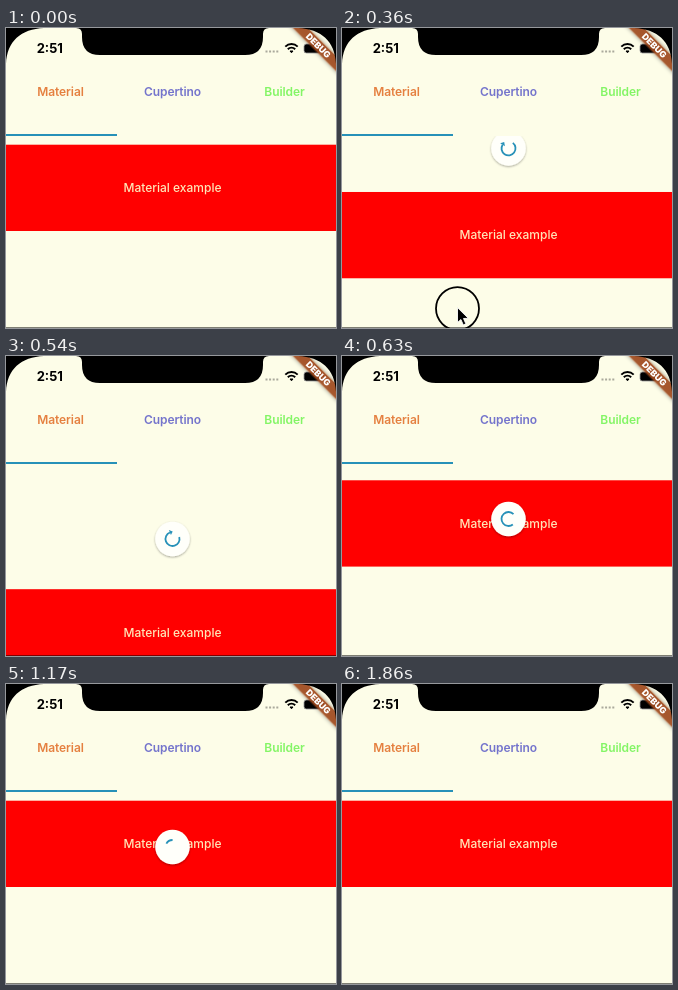
These frames come from a looping animation (330x300 px, 1.98 s). An HTML page:

```html
<!DOCTYPE html>
<html lang="en">
<head>
<meta charset="utf-8">
<title>Pull to refresh</title>
<style>
html, body { margin: 0; height: 100%; overflow: hidden; background: #fdfde8; }
svg { display: block; width: 330px; height: 300px; }
text { font: 12px Inter, "Noto Sans", sans-serif; text-anchor: middle; }
.tab { font-weight: 600; letter-spacing: -.08px; }
</style>
</head>
<body>
<svg viewBox="0 0 330 300">
  <defs>
    <clipPath id="body"><rect y="108" width="330" height="192"/></clipPath>
    <filter id="lift" x="-30%" y="-30%" width="160%" height="160%">
      <feDropShadow dx="0" dy="1" stdDeviation="1.2" flood-opacity=".35"/>
    </filter>
    <filter id="glow" x="-20%" y="-100%" width="140%" height="300%">
      <feDropShadow dx="0" dy="0" stdDeviation="2" flood-opacity=".5"/>
    </filter>
  </defs>
  <rect width="330" height="300" fill="#fdfde8"/>

  <g clip-path="url(#body)">
    <g id="list">
      <rect y="116.7" width="330" height="86.3" fill="#f00"/>
      <text x="166.5" y="164" fill="#ffe6b8" style="font-weight:450">Material example</text>
    </g>
    <g id="spinner">
      <circle r="17.3" fill="#fffffa" filter="url(#lift)"/>
      <path id="arc" fill="none" stroke="#2791b8" stroke-width="1.8"/>
      <path id="head" d="M4.2 0H9.8L7 3Z" fill="#2791b8"/>
    </g>
  </g>
  <rect y="299" width="330" height="1" opacity=".5"/>

  <text class="tab" x="54.5" y="68" fill="#e58040">Material</text>
  <text class="tab" x="166.5" y="68" fill="#7474cc">Cupertino</text>
  <text class="tab" x="278.5" y="68" fill="#84f566">Builder</text>
  <rect y="106" width="111" height="2" fill="#2791b8"/>

  <text x="43.8" y="25.4" style="font-size:13px;font-weight:700">2:51</text>
  <path d="M259.5 23.5h13" stroke="#aaa99c" stroke-width="2" stroke-dasharray="2 1.6"/>
  <g fill="none" stroke="#000" stroke-width="2">
    <path d="M279.3 18.6a9 9 0 0 1 12.4 0M281.8 21.3a5.4 5.4 0 0 1 7.4 0"/>
    <path d="M284 23l1.5 1.8 1.5-1.8z" stroke-width="1" fill="#000"/>
  </g>
  <rect x="298" y="16" width="17.5" height="9" rx="2.6" stroke="#999" stroke-width=".8"/>
  <path d="M317 19v3.2q1.3-.4 1.3-1.6t-1.3-1.6"/>

  <g transform="translate(330) rotate(45)">
    <rect x="-45" y="19.8" width="90" height="10.6" fill="#a34c1c" fill-opacity=".88" filter="url(#glow)"/>
    <text y="28.2" fill="#fff" style="font-size:8.8px;font-weight:900">DEBUG</text>
  </g>
  <path d="M0 0H38C15 1 1 13 0 36ZM330 0H292C315 1 329 13 330 36Z"/>
  <path d="M70 0q6 0 6 6v3q0 18 18 18H239q18 0 18-18V6q0-6 6-6Z"/>

  <g id="cursor">
    <circle id="ring" r="21.5" fill="none" stroke="#000" stroke-width="1.8"/>
    <path d="M0-1V14l3.4-3.1 2.4 5.4 2.6-1.1-2.4-5.3 4.8-.2Z" stroke="#fff" stroke-width=".9"/>
  </g>
</svg>
<script>
const LOOP = 1980, RAD = Math.PI / 180, RELEASE = 560, LOADING = 630;
const el = id => document.getElementById(id);
const list = el('list'), spinner = el('spinner'), arc = el('arc'),
  head = el('head'), cursor = el('cursor'), ring = el('ring');

const part = (t, a, b) => Math.min(1, Math.max(0, (t - a) / (b - a)));
const smooth = p => p * p * (3 - 2 * p);
const mix = (a, b, p) => a + (b - a) * p;
const show = (node, on) => node.style.display = on ? '' : 'none';
const move = (node, x, y, extra = '') =>
  node.setAttribute('transform', `translate(${x} ${y}) ${extra}`);

function pullOffset(t) {
  if (t < RELEASE) return 117 * smooth(part(t, 300, 440)) - .5 * part(t, 450, 540);
  return t < 760 ? 116.5 * Math.exp((RELEASE - t) / 26) : 0;
}

function spinnerY(t) {
  if (t < 450) return mix(90, 174, smooth(part(t, 300, 450)));
  if (t < RELEASE) return mix(174, 183, part(t, 450, 540));
  return mix(183, 163, smooth(part(t, RELEASE, LOADING)));
}

function arcEnd(t) {
  if (t < RELEASE) return 230 + (t - 450) * .2;
  if (t < LOADING) return mix(252, 315, part(t, RELEASE, LOADING));
  return 315 + (t - LOADING) * .5833;
}

function drawArc(t) {
  const end = arcEnd(t);
  const wave = Math.max(0, t - LOADING) / 770 * Math.PI;
  const sweep = 10 + 127 * (1 + Math.cos(wave));
  const point = a => `${7 * Math.cos(a * RAD)} ${7 * Math.sin(a * RAD)}`;
  arc.setAttribute('d',
    `M${point(end - sweep)}A7 7 0 ${+(sweep > 180)} 1 ${point(end)}`);
  head.setAttribute('transform', `rotate(${end})`);
  show(head, t < 600);
}

function draw(t) {
  move(list, 0, pullOffset(t));

  const scale = 1 - smooth(part(t, 1400, 1560));
  show(spinner, t > 300 && scale > 0);
  move(spinner, 166.5, spinnerY(t), `scale(${scale})`);
  drawArc(t);

  // The pointer rises into view, presses, then drags the list down.
  const y = mix(325, 220, smooth(part(t, 30, 240))) + 150 * smooth(part(t, 300, 440));
  move(cursor, 115.5, y);
  show(cursor, t > 30 && t < 450);
  show(ring, t >= 240);
}

function frame() {
  draw(performance.now() % LOOP);
  requestAnimationFrame(frame);
}
frame();
</script>
</body>
</html>
```
